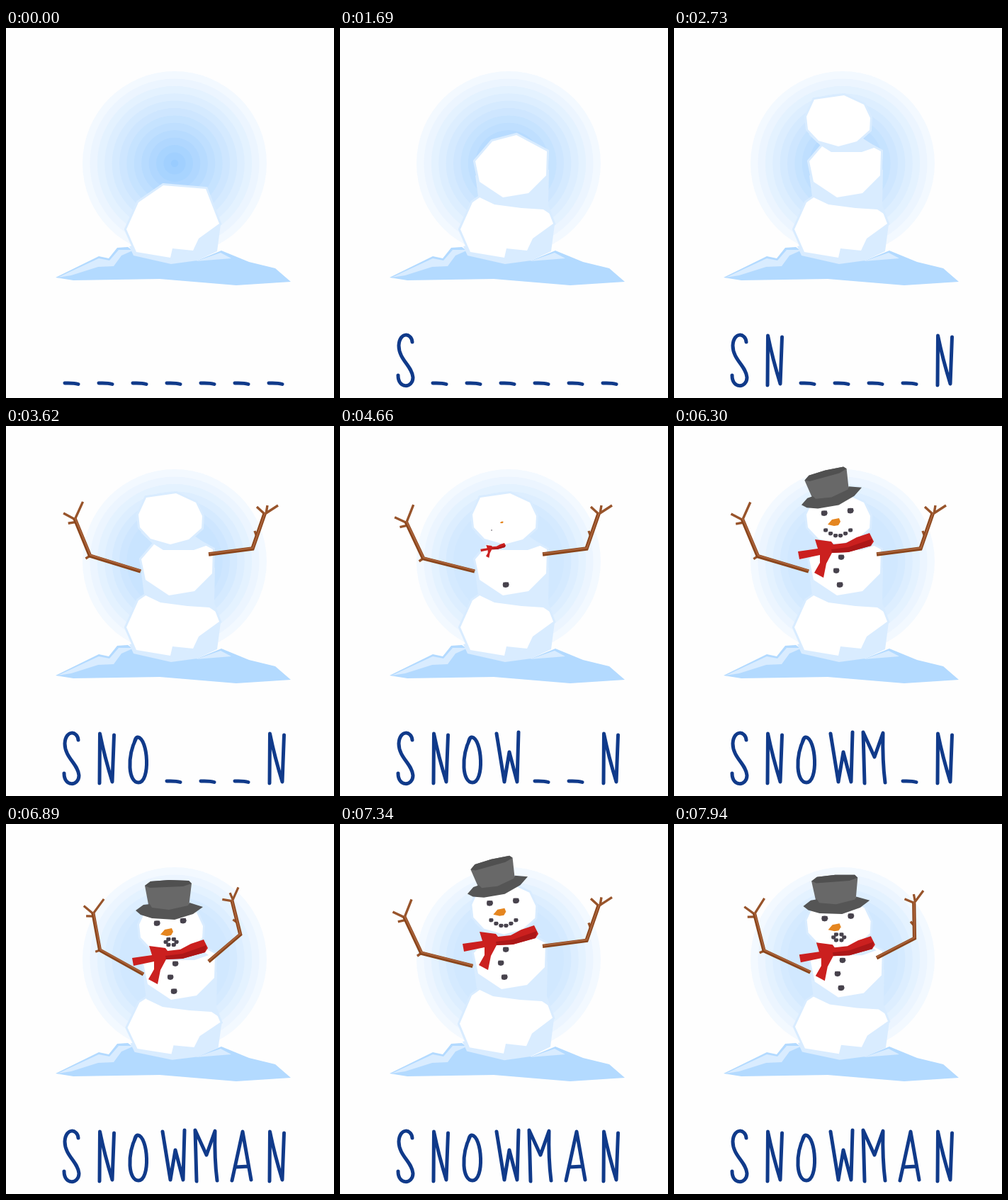
Animation, 463 px wide and 522 px high, one loop 8 s. Source, as an HTML page with a canvas:

```html
<!DOCTYPE html>
<html lang="en">
<head>
<meta charset="utf-8">
<title>Snowman word game</title>
<style>
html, body { margin: 0; width: 100%; height: 100%; overflow: hidden; background: #fefefe; }
canvas { display: block; width: 463px; height: 522px; }
</style>
</head>
<body>
<canvas id="stage" width="463" height="522"></canvas>
<script>
const ctx = document.getElementById('stage').getContext('2d');
const LOOP = 8000, HOLD = 500, STEP = 148.8;
const SHADE = '#d9ecff', SNOW = '#ffffff', COAL = '#47424c', INK = '#103a8a';

const clamp = v => Math.max(0, Math.min(1, v));
const mix = (a, b, t) => a + (b - a) * t;
const grow = (k, start, len) => clamp((k - start) / len);
const easeOut = t => 1 - (1 - t) ** 2;

function fill(points, color) {
  ctx.fillStyle = color;
  ctx.fill(new Path2D(`M${points}Z`));
}

function stroke(path, color, width) {
  ctx.strokeStyle = color;
  ctx.lineWidth = width;
  ctx.stroke(new Path2D(path));
}

// Draws with the origin moved to (x, y), then turned and scaled there.
function at(x, y, scale, degrees, draw) {
  if (scale <= 0) return;
  ctx.save();
  ctx.translate(x, y);
  ctx.rotate(degrees * Math.PI / 180);
  ctx.scale(scale, scale);
  draw();
  ctx.restore();
}

function popAbout(x, y, scale, draw) {
  at(x, y, scale, 0, () => { ctx.translate(-x, -y); draw(); });
}

function shifted(x, y, draw) { at(x, y, 1, 0, draw); }

function lump(x, y, r, scale) {
  at(x, y, scale, 0, () => {
    ctx.fillStyle = COAL;
    ctx.beginPath();
    for (let i = 0; i < 8; i++) {
      const a = i * Math.PI / 4, q = r * (0.95 + 0.15 * Math.sin(3 * i));
      ctx.lineTo(q * Math.cos(a), 0.9 * q * Math.sin(a));
    }
    ctx.fill();
  });
}

// The inner rings pale while the figure is being built.
function sky(k) {
  const rings = 13, cap = mix(1, 0.38, grow(k, 9, 14));
  for (let i = 0; i < rings; i++) {
    const t = Math.min(cap, i / (rings - 1));
    ctx.fillStyle = `rgb(${mix(243, 153, t)},${mix(249, 204, t)},255)`;
    ctx.beginPath();
    ctx.arc(238, 191, 130 - i * 10.4, 0, Math.PI * 2);
    ctx.fill();
  }
}

function hill() {
  fill('70,352 131,322 145,325 157,310 172,309 184,318 270,328 304,314 343,330 380,339 402,358 325,363 217,354 95,356', '#b3daff');
  fill('73,352 131,325 146,328 159,313 181,313 163,321 152,336 130,337 92,349', SHADE);
  fill('268,329 303,317 318,325', SHADE);
}

// A white facetted ball with a pale rim and a shaded patch below it.
function ball(points, patch) {
  fill(patch, SHADE);
  stroke(`M${points}Z`, SHADE, 6);
  fill(points, SNOW);
}

function base(squash) {
  ctx.save();
  ctx.translate(1.5 * squash, 330);
  ctx.scale(1, 1 - 0.07 * squash);
  ctx.translate(0, -330);
  ball('222,222 282,227 301,276 272,297 264,314 235,311 232,324 184,316 170,284 187,246',
       '174,308 180,321 233,333 270,328 298,315 303,277');
  ctx.restore();
}

function belly() {
  ball('191,188 215,160 249,151 292,174 291,208 266,233 230,239 197,217',
       '191,208 195,238 218,249 256,254 287,256 299,264 294,250 295,200');
}

function head() {
  ball('187,125 198,101 240,95 268,108 277,127 276,144 258,160 232,167 204,159 189,143',
       '190,150 206,165 222,175 265,175 285,168 266,155');
}

function branch(path, twigs) {
  ctx.lineCap = 'butt';
  stroke(twigs, '#98542b', 3.4);
  stroke(path, '#8a451b', 5.4);
  shifted(0.5, -1, () => stroke(path, '#a9623a', 2.2));
}

function arms(k, d) {
  if (k < 17) return;
  const raise = Math.max(0, d), swing = grow(k, 17, 3), size = 1 - 0.06 * raise;
  const sway = 1.5 * Math.cos((k - 21) * Math.PI / 8);
  at(190 + 4 * d, 205 + 7 * d, size, -90 * (1 - swing) + sway + 14.5 * raise, () =>
    branch('M0,0 L-72,-20 -95,-72', 'M-95,-70 L-84,-96 M-95,-71 L-111,-79 M-94,-67 L-104,-65 M-72,-20 L-78,-16'));
  at(286, 181 + 13 * d, size, 100 * (1 - swing ** 3) - 33 * raise, () =>
    branch('M0,0 L62,-8 79,-57', 'M78,-56 L98,-69 M80,-56 L68,-67 M81,-57 L83,-69 M68,-25 L65,-33'));
}

function scarf() {
  fill('199,160 222,163 225,167 243,165 258,157 276,151 282,163 278,169 246,178 223,179 215,194 211,214 198,207 206,193 206,182 177,188 175,177 203,173', '#cb201f');
  fill('222,174 246,171 280,159 278,169 246,178 223,179', '#ac1718');
}

function face(k, d) {
  lump(212, 123, 5, grow(k, 29, 2));
  lump(249, 119.5, 5, grow(k, 30, 2));
  popAbout(229, 136, grow(k, 27.6, 1.5), () =>
    fill('217,139 223,132 233,130 235,135 232,140 226,141', '#e58620'));

  // A smile whose pebbles gather into an open mouth.
  const round = clamp(d * 1.7), pebbles = 6;
  for (let i = 0; i < pebbles; i++) {
    const u = i / (pebbles - 1), a = Math.PI * (1 - 2 * i / pebbles);
    lump(mix(214 + 35 * u, 232 + 7.5 * Math.cos(a), round),
         mix(147 + 8 * Math.sin(Math.PI * u), 149.5 + 4.6 * Math.sin(a), round),
         3.5, grow(k, 27.7 + i * 0.5, 1.2));
  }
}

function hat(k, d) {
  const t = clamp(1.4 * d);
  at(mix(219, 230, t), 86 + 19 * d, mix(0.93, 1, t) * easeOut(grow(k, 33, 4)), -13 * (1 - t), () => {
    fill('-34,-18 -26,-24 0,-26 28,-25 32,-21 28,12 0,18 -28,14', '#686868');
    fill('-34,-18 -26,-24 0,-26 28,-25 32,-21 20,-17 -27,-15', '#505050');
    fill('-47,17 -36,9 -27,8 -24,13 0,16 27,10 29,6 48,12 34,22 8,30 -24,28 -40,23', '#555555');
  });
}

const N = 'M132,504 L132.5,434 Q139,466 150,502 L152.5,436';
const LETTERS = [
  [0, 'M102,443 C101,430 84,428 83,448 C83,468 102,477 103,493 C103,508 82,510 82,490'],
  [9, N],
  [17, 'M184,440 C170,468 173,503 187,503 C204,503 201,441 186,439 C183,439 182,443 181,447'],
  [26, 'M221,434 L232,502 239,460 250,502 252,432'],
  [33, 'M269,504 L267,432 283,467 295,433 Q294,472 298,503'],
  [40, 'M319,503 L334,434 346,502 M324,484 L342,483'],
  [9, N, 240]
];

function word(k) {
  ctx.lineCap = ctx.lineJoin = 'round';
  LETTERS.forEach(([start, path, dx = 0], i) => {
    const shown = k >= start;
    shifted(shown ? dx : 48 * i, 0, () =>
      stroke(shown ? path : 'M83,501 Q96,500.5 102,502.5', INK, 5));
  });
}

function draw(k) {
  // d is how far the figure ducks; below zero it stretches.
  const d = Math.cos((k - 43) * Math.PI / 4.1) * grow(k, 40, 3);
  ctx.fillStyle = '#fefefe';
  ctx.fillRect(0, 0, 463, 522);
  ctx.lineJoin = 'miter';
  sky(k);
  hill();
  base(d);
  shifted(3 * d, 9 * d, () => popAbout(243, 235, easeOut(grow(k, 1, 6)), belly));
  shifted(d, 17 * d, () => popAbout(235, 163, easeOut(grow(k, 9, 6)), head));
  arms(k, d);
  shifted(3 * d, 12 * d, () => {
    lump(236, 185, 4.8, grow(k, 29, 2));
    lump(229, 204, 4.8, grow(k, 28, 2));
    lump(234, 224, 5, grow(k, 26, 2));
    popAbout(210, 172, grow(k, 27, 3), scarf);
  });
  shifted(d, 17 * d, () => face(k, d));
  hat(k, d);
  word(k);
}

function frame() {
  const t = performance.now() % LOOP;
  draw(t < HOLD ? -1 : Math.floor((t - HOLD + 12) / STEP));
  requestAnimationFrame(frame);
}
frame();
</script>
</body>
</html>
```
